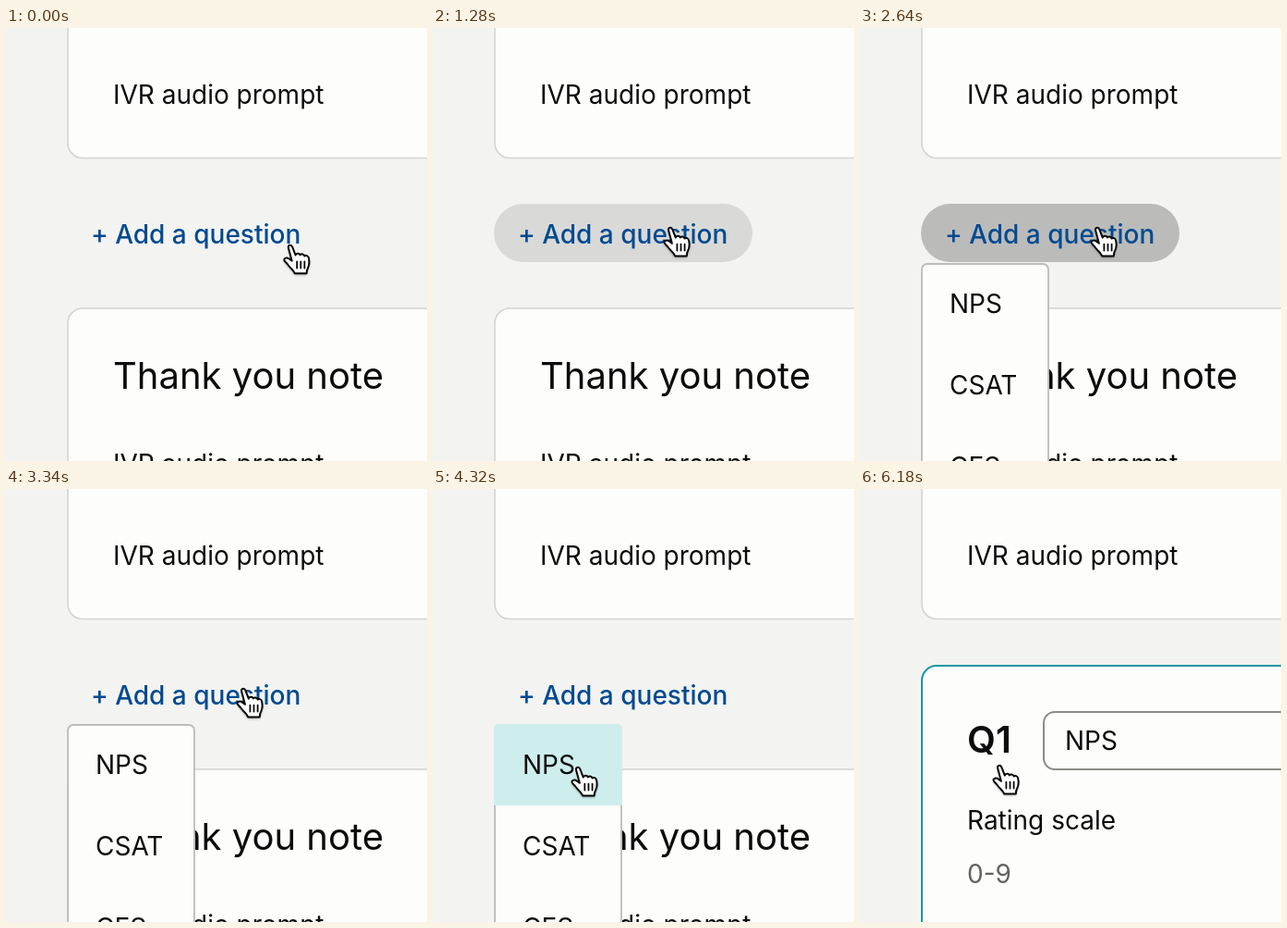
Recreate the animation shown at these times as an HTML page with a canvas. Size 456x468 px, loop 6200 ms.

```html
<!DOCTYPE html>
<html lang="en">
<head>
<meta charset="utf-8">
<title>Add a question</title>
<style>
  html, body { margin: 0; width: 100%; height: 100%; overflow: hidden; background: #f3f3f1; }
  canvas { display: block; }
</style>
</head>
<body>
<canvas id="stage" width="456" height="468"></canvas>
<script>
const ctx = document.getElementById('stage').getContext('2d');
const W = 456, H = 468, LOOP = 6200;
const PAGE = '#f3f3f1', CARD = '#fdfdfc', EDGE = '#d4d4d2', INK = '#0c0c0c';

const hand = new Path2D(
  'M6.2 4C5 .6 9.2 -.4 10.4 2.8L13.8 11.6C14.6 9.4 18 9.2 18.8 11.5' +
  'C19.6 9.9 23 10.1 23.6 12.6C24.7 11.4 27.6 12 28.1 14.5' +
  'C29.1 19 29 22 27.2 25.5C26 27.6 25.8 29 25.8 31.4L13 31.4' +
  'C12.4 28.6 8 25.4 5.5 21.8C4 19.6 2 18.6 1.6 17' +
  'C1.2 14.6 4.6 13.8 7 15.6L9.9 17.8Z');

const mix = (a, b, k) => a + (b - a) * k;
const easeOut = p => 1 - (1 - p) ** 3;
const easeInOut = p => p < 0.5 ? 2 * p * p : 1 - 2 * (1 - p) ** 2;

// Eased progress of a transition between two times.
function ramp(t, start, end, ease = easeOut) {
  return ease(Math.min(1, Math.max(0, (t - start) / (end - start))));
}

function faded(alpha, draw) {
  if (alpha <= 0) return;
  ctx.save();
  ctx.globalAlpha = alpha;
  draw();
  ctx.restore();
}

function box(x, y, w, h, radius, fill, stroke, line = 2) {
  ctx.beginPath();
  ctx.roundRect(x, y, w, h, radius);
  ctx.fillStyle = fill;
  ctx.fill();
  if (!stroke) return;
  ctx.strokeStyle = stroke;
  ctx.lineWidth = line;
  ctx.stroke();
}

function label(text, x, y, size = 28, color = INK, weight = 400) {
  ctx.font = `${weight} ${size}px Inter, sans-serif`;
  ctx.fillStyle = color;
  ctx.fillText(text, x, y);
}

function drawPage(t) {
  ctx.fillStyle = PAGE;
  ctx.fillRect(0, 0, W, H);

  box(67, -40, 480, 180.5, 16, CARD, EDGE, 1.6);
  label('IVR audio prompt', 116, 82);

  const hover = ramp(t, 20, 270);
  const dark = ramp(t, 2120, 2420);
  const shown = 1 - ramp(t, 2780, 3080);
  faded(hover * shown * (1 - dark), () => box(66, 190, 280, 63, 31.5, '#d9d9d7'));
  faded(dark * shown, () => box(66, 190, 280, 63, 31.5, '#bbbbba'));
  label('+ Add a question', 92, 233, 28, '#004a90', 500);

  box(67, 303, 480, 300, 16, CARD, EDGE, 1.6);
  label('Thank you note', 116, 390, 40);
  label('IVR audio prompt', 116, 481);
}

function drawMenu(t) {
  faded(ramp(t, 2260, 2480), () => {
    box(67, 255, 137, 300, 6, CARD, '#bcbcba', 1.8);
    faded(ramp(t, 3930, 4080), () => box(66, 254, 139, 88, [5, 5, 0, 0], '#cdeeec'));
    label('NPS', 97, 308);
    label('CSAT', 97, 396);
    label('CES', 97, 484);
  });
}

function drawQuestion(t) {
  faded(ramp(t, 5990, 6110), () => {
    ctx.fillStyle = PAGE;
    ctx.fillRect(0, 146, W, H - 146);
    box(67, 191, 480, 400, 16, CARD, '#1798a0');
    label('Q1', 116, 285, 40, INK, 600);
    box(199, 241, 400, 62, 12, CARD, '#8c8c86');
    label('NPS', 222, 282);
    label('Rating scale', 116, 368);
    label('0-9', 116, 426, 28, '#626262');
  });
}

// The ring stays around the pointer while the button is held down.
function drawRing(t, x, y, down, up) {
  if (t < down || t >= up) return;
  ctx.beginPath();
  ctx.arc(x, y, 61, 0, Math.PI * 2);
  ctx.strokeStyle = '#0a0a0a';
  ctx.lineWidth = 2.6;
  ctx.stroke();
}

function drawHand(t) {
  const onButton = ramp(t, 0, 640);
  const onItem = ramp(t, 3480, 4300, easeInOut);
  const settled = ramp(t, 4320, 4700);
  const x = mix(mix(mix(300, 249, onButton), 149, onItem), 143, settled);
  const y = mix(mix(mix(234, 215, onButton), 300, onItem), 298, settled);

  ctx.save();
  ctx.translate(x, y);
  ctx.lineJoin = ctx.lineCap = 'round';
  ctx.shadowColor = 'rgba(0, 0, 0, .4)';
  ctx.shadowBlur = 3;
  ctx.shadowOffsetY = 1.5;
  ctx.fillStyle = '#fff';
  ctx.fill(hand);
  ctx.shadowColor = 'transparent';
  ctx.strokeStyle = '#080808';
  ctx.lineWidth = 2;
  ctx.stroke(hand);
  ctx.beginPath();
  for (const lineX of [15.4, 19.5, 23.6]) {
    ctx.moveTo(lineX, 18.6);
    ctx.lineTo(lineX, 25.6);
  }
  ctx.lineWidth = 1.8;
  ctx.stroke();
  ctx.restore();
}

function frame() {
  const t = performance.now() % LOOP;
  drawPage(t);
  drawMenu(t);
  drawRing(t, 258, 215, 2120, 2260);
  drawRing(t, 153, 298, 5320, 5540);
  drawQuestion(t);
  drawHand(t);
  requestAnimationFrame(frame);
}
frame();
</script>
</body>
</html>
```
